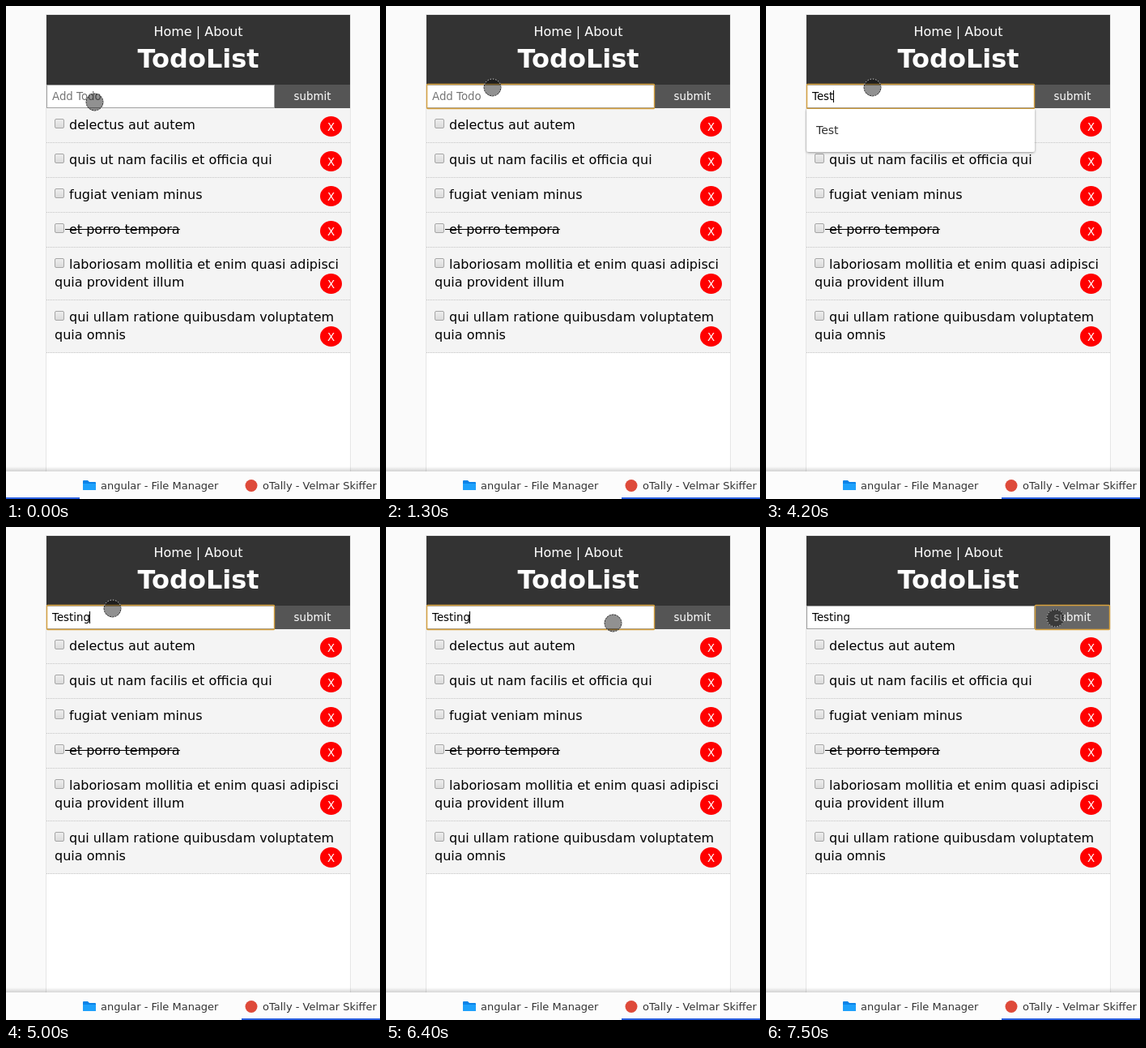
Animation, 462 px wide and 608 px high, one loop 8000 ms. Source, as an HTML page:

```html
<!DOCTYPE html>
<html lang="en">
<head>
<meta charset="utf-8">
<title>TodoList</title>
<style>
html, body { margin: 0; width: 100%; height: 100%; overflow: hidden; background: #fafafa; }
svg { display: block; width: 100vw; height: 100vh; }
text { font: 16px "DejaVu Sans", sans-serif; white-space: pre; }
.small { font-size: 13.333px; }
.title { font-size: 32px; font-weight: bold; }
.bar { font-size: 13px; fill: #333; }
.mid { text-anchor: middle; fill: #fff; }
</style>
</head>
<body>
<svg viewBox="0 0 462 608">
  <defs>
    <linearGradient id="box" x2="0" y2="1">
      <stop stop-color="#eee"/><stop offset="1" stop-color="#dadada"/>
    </linearGradient>
    <linearGradient id="shade" x2="0" y2="1">
      <stop stop-opacity="0"/><stop offset="1" stop-opacity=".16"/>
    </linearGradient>
    <filter id="drop" x="-5%" y="-10%" width="110%" height="130%">
      <feDropShadow dx="0" dy="1" stdDeviation="1.5" flood-opacity=".4"/>
    </filter>
  </defs>

  <rect width="462" height="608" fill="#fafafa"/>
  <rect x="49" y="10" width="377" height="570" fill="#e6e6e6"/>
  <rect x="50" y="11" width="375" height="570" fill="#fff"/>
  <rect x="50" y="11" width="375" height="86" fill="#333"/>
  <text class="mid" x="237.5" y="37">Home | About</text>
  <text class="mid title" x="237.5" y="76">TodoList</text>

  <g id="list"></g>

  <rect x="50.5" y="97.5" width="281" height="28" fill="#fff" stroke="#a0a0a0"/>
  <rect id="button" x="332" y="97" width="93" height="29"/>
  <text class="mid small" x="378.5" y="116">submit</text>
  <rect id="ring" y="96.5" height="30" rx="1" fill="none" stroke="#d6a03c" stroke-width="1.4"/>
  <text id="field" class="small" x="57" y="116"></text>
  <rect id="caret" y="104" width="1" height="15"/>

  <g id="menu">
    <path d="M50 127h282v50q0 3 -3 3h-276q-3 0 -3 -3z" fill="#fff" filter="url(#drop)"/>
    <text x="62" y="158" style="font-size:14px" fill="#333">Test</text>
  </g>

  <rect y="568" width="462" height="6" fill="url(#shade)"/>
  <rect y="574" width="462" height="34" fill="#fcfcfc"/>
  <path d="M95 586q0-1 1-1h5l2 2h7q1 0 1 1v8q0 1-1 1h-14q-1 0-1-1z" fill="#0c83e8"/>
  <path d="M95 589h16v7q0 1-1 1h-14q-1 0-1-1z" fill="#1ea1fb"/>
  <text class="bar" x="117" y="596">angular - File Manager</text>
  <circle cx="303" cy="591.5" r="7.5" fill="#de4a3a"/>
  <text class="bar" x="317" y="596">oTally - Velmar Skiffer</text>
  <rect id="active" y="606" height="2" fill="#2a5fe0"/>

  <g id="touch">
    <circle r="10.5" fill="#000" fill-opacity=".43"/>
    <circle r="10.5" fill="none" stroke="#222"/>
    <circle r="10.5" fill="none" stroke="#ddd" stroke-dasharray="1.5 1.8"/>
  </g>
  <path id="move" transform="translate(131 100)" stroke="#fff" stroke-width="1.6" paint-order="stroke"
    d="M0-7.5l3 3.5h-2v3h3v-2l3.5 3-3.5 3v-2h-3v3h2l-3 3.5-3-3.5h2v-3h-3v2l-3.5-3 3.5-3v2h3v-3h-2z"/>
</svg>
<script>
const $ = id => document.getElementById(id);
const LOOP = 8000;

const todos = [
  ["delectus aut autem"],
  ["quis ut nam facilis et officia qui"],
  ["fugiat veniam minus"],
  ["et porro tempora"],
  ["laboriosam mollitia et enim quasi adipisci", "quia provident illum"],
  ["qui ullam ratione quibusdam voluptatem", "quia omnis"]
];

function drawList() {
  let y = 126, out = "";
  todos.forEach((lines, i) => {
    const h = 21 + 22 * lines.length, end = y + h;
    out += `<rect x="50" y="${y}" width="375" height="${h}" fill="#f4f4f4"/>
      <path d="M50 ${end - .5}h375" stroke="#c4c4c4" stroke-dasharray="1 1"/>
      <rect x="60.5" y="${y + 13.5}" width="11" height="11" rx="1.5" fill="url(#box)" stroke="#a6a6a6"/>`;
    lines.forEach((s, n) => out += `<text x="${n ? 60 : 78}" y="${y + 26 + 22 * n}">${s}</text>`);
    if (i === 3) out += `<rect x="73" y="${y + 20}" width="142" height="1"/>`;
    out += `<ellipse cx="401.5" cy="${end - 20.5}" rx="13.5" ry="12.5" fill="#f00"/>
      <text class="mid small" x="401.5" y="${end - 15}">X</text>`;
    y = end;
  });
  $("list").innerHTML = out;
}

// [time, x, y] of the touch spot
const path = [
  [0, 109.5, 118.5], [1000, 109.5, 118.5], [1300, 131.5, 100.5], [5800, 131.5, 100.5],
  [5900, 176, 29.5], [6000, 236, 52], [6100, 273.5, 86.5], [6200, 273.5, 86.5],
  [6400, 280.5, 118.5], [6600, 315, 130.5], [6800, 368, 124], [6900, 375.5, 116],
  [7000, 357.5, 112.5], [LOOP, 357.5, 112.5]
];
const keys = [3300, 3500, 3800, 4200, 4500, 4700, 5000];
const blinks = [[600, 1100], [1700, 2200], [3300, 5500], [6000, 6500], [7000, 7200]];

const within = (t, a, b) => t >= a && t < b;
const show = (id, on) => $(id).setAttribute("visibility", on ? "visible" : "hidden");
const set = (id, attrs) => {
  for (const k in attrs) $(id).setAttribute(k, attrs[k]);
};

function spot(t) {
  const i = path.findIndex(p => p[0] > t);
  const [t0, x0, y0] = path[i - 1], [t1, x1, y1] = path[i];
  const k = (t - t0) / (t1 - t0);
  return [x0 + (x1 - x0) * k, y0 + (y1 - y0) * k];
}

function render(time) {
  const t = Math.floor(time % LOOP / 100) * 100;

  set("active", t < 400 ? { x: 0, width: 91 } : { x: 291, width: 171 });

  const typed = "Testing".slice(0, keys.filter(k => t >= k).length);
  const field = $("field");
  const label = typed || "Add Todo";
  if (field.textContent !== label) field.textContent = label;
  set("field", { fill: typed ? "#000" : "#757575" });
  set("caret", { x: typed ? Math.round(56.4 + field.getComputedTextLength()) : 57 });
  show("caret", blinks.some(([a, b]) => within(t, a, b)));
  show("menu", within(t, 3300, 4600));

  const pressed = t >= 7200;
  show("ring", t >= 600);
  set("ring", pressed ? { x: 332.5, width: 92 } : { x: 50.5, width: 281 });
  const grey = 85 + 17 * Math.min(1, Math.max(0, (t - 7100) / 400));
  set("button", { fill: `rgb(${grey},${grey},${grey})` });

  const dragging = within(t, 2500, 3300);
  show("touch", !dragging);
  show("move", dragging);
  set("touch", { transform: `translate(${spot(t)})` });
}

drawList();
const start = performance.now();
function frame() {
  render(performance.now() - start);
  requestAnimationFrame(frame);
}
frame();
</script>
</body>
</html>
```
